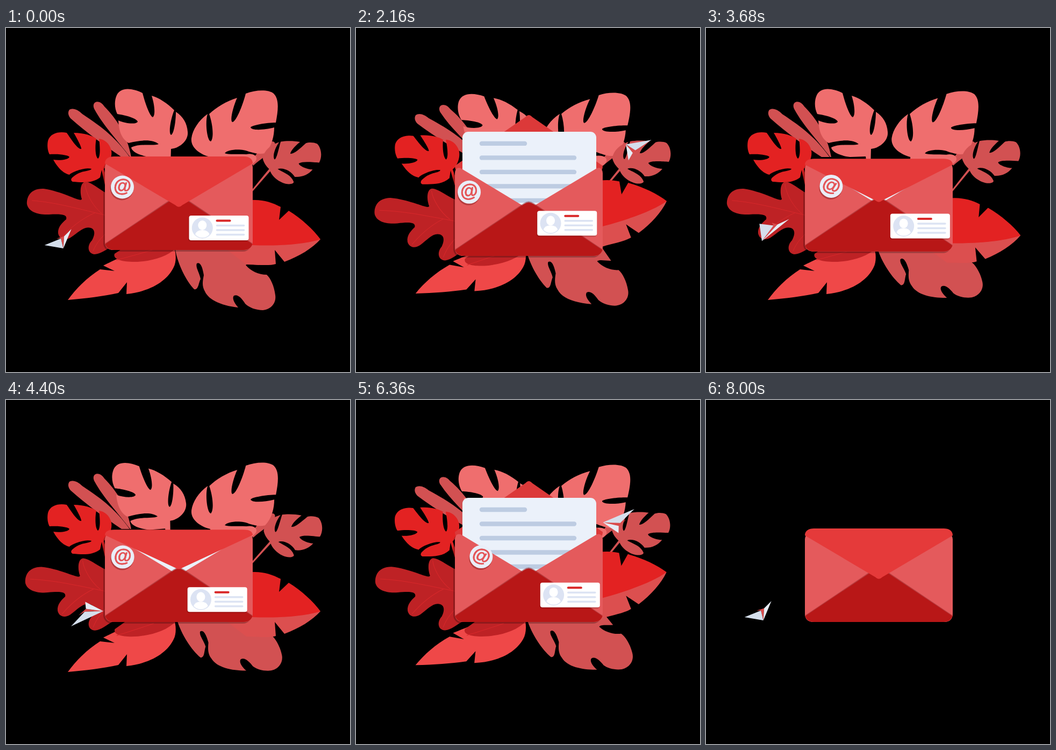
Animation of 640x640 px, one loop 8040 ms. Source, as an HTML page:

```html
<!DOCTYPE html>
<html lang="en">
<head>
<meta charset="utf-8">
<title>Open letter</title>
<style>
html, body { margin: 0; width: 100%; height: 100%; overflow: hidden; background: #000; }
svg { display: block; width: 100vw; height: 100vh; }
</style>
</head>
<body>
<svg viewBox="0 0 640 640">
  <g id="leaves">
    <g id="bars" fill="#d25152">
      <path d="M118 152C125 148 134 152 142 160C180 185 205 205 230 240L215 240C185 220 150 195 120 168C115 162 115 156 118 152Z"/>
      <path d="M165 139C170 135 178 138 183 146C205 168 226 200 233 240L231 240C208 210 180 180 165 152C162 147 162 142 165 139Z"/>
    </g>
    <path fill="#d25152" d="M455 250C468 230 485 212 496 211C502 212 502 218 497 224C485 238 472 245 460 256Z"/>
    <path id="topLeft" fill="#ef6e6e" d="M254 121C235 112 214 109 206 125C201 136 202 150 207 160C222 162 243 168 245 174C243 180 222 178 209 172C210 190 214 205 228 214C255 207 275 208 284 216C275 220 250 214 233 222C233 230 250 238 268 240L297 239L300 262L306 262L307 225C322 224 340 210 338 193C337 178 330 165 316 156C316 175 312 198 307 199C302 196 306 170 313 153C300 140 285 130 271 126C277 145 278 163 273 166C267 163 259 140 254 121Z"/>
    <path id="topRight" fill="#ef6e6e" d="M446 122C465 115 488 114 498 122C508 132 507 150 502 176C485 176 456 181 455 185C457 191 480 190 499 185C499 200 495 220 482 233C470 236 460 232 452 230C440 224 412 225 407 233C415 236 430 234 447 235C462 232 470 240 464 248L450 262L380 262L380 240C360 235 343 222 345 205C347 190 358 172 375 160C370 175 374 210 381 211C387 205 385 180 378 160C392 147 410 136 430 130C423 145 416 172 421 175C428 175 440 145 446 122Z"/>
    <path id="left" fill="#e32222" d="M113 195C100 192 82 195 78 210C76 220 78 230 81 235C95 234 116 236 118 240C116 245 100 247 88 245C95 258 105 270 118 273C125 266 150 259 159 262C158 267 140 264 126 276C120 280 120 284 124 286C140 287 160 290 175 278L178 264L184 292L190 290L182 262C192 255 198 240 196 228C193 215 183 207 173 206C175 220 176 240 171 243C165 238 166 215 168 206C160 200 145 195 126 195C133 207 141 222 140 225C133 226 120 205 113 195Z"/>
    <path id="right" fill="#d25152" d="M507 212C490 217 478 230 477 243C480 253 485 258 489 262L456 303L458 305L491 266C495 275 505 285 520 289C530 291 536 288 535 285C530 272 515 268 505 262C515 258 530 265 537 276C550 277 562 272 570 262C560 262 545 256 544 251C552 246 572 249 582 249C588 238 586 222 578 214C572 211 562 211 557 213C545 224 535 234 528 233C530 225 540 216 546 211C535 209 520 209 510 211C506 225 503 243 499 244C495 240 498 225 507 212Z"/>
    <path id="bottomRight" fill="#d25152" d="M315 413C320 440 335 470 350 486C358 488 358 475 362 467C360 455 352 445 355 438C362 434 366 447 368 460C366 470 364 480 370 490C378 508 405 517 432 520C425 512 420 503 424 498C432 494 440 505 445 513C452 520 465 525 478 525C495 523 503 510 501 497C499 480 492 465 485 459C470 459 455 452 446 441C450 437 462 441 472 441L440 390L320 390Z"/>
    <g id="spear">
      <path fill="#dc4f4f" d="M585 393C570 410 545 425 518 435L500 413L502 439C490 443 465 440 447 440L400 404L459 402Z"/>
      <path fill="#e32222" d="M400 320L459 320C478 319 497 325 511 333L508 357L526 340C550 355 572 375 585 393C560 402 510 406 459 404L400 404Z"/>
    </g>
    <path id="bottomLeft" fill="#ef4848" d="M115 506C130 485 150 465 175 449L202 452L181 442C200 432 240 415 260 405L312 405C317 420 317 435 312 445C300 470 270 490 224 495L225 473L209 493C180 499 150 503 115 506Z"/>
    <g id="oak" fill="#be2225">
      <path d="M148 286C138 287 137 305 141 318C140 326 110 305 70 299C45 298 38 315 39 328C42 342 60 348 80 347C100 346 115 346 112 356C105 362 96 370 97 382C99 393 110 396 120 390C135 380 145 368 158 372C168 376 164 388 160 395C150 405 152 420 165 421C178 420 185 412 200 405L230 320C190 320 165 287 148 286Z"/>
      <path d="M202 420C198 430 215 436 245 435C275 433 300 425 316 410L240 395Z"/>
      <path fill="none" stroke="#d8282b" d="M48 321C90 324 130 335 200 352M147 290C148 305 160 330 178 345M105 388C120 372 140 355 165 344M162 415C168 400 180 385 200 370M205 432C230 425 250 420 275 412"/>
    </g>
  </g>
  <g id="plane">
    <polygon fill="#d94a4a"/><polygon fill="#e6ecf5"/><polygon fill="#d5dfec"/>
  </g>
  <g id="envelope">
    <rect id="shade" x="181" y="248" width="276" height="168" rx="16" opacity=".25"/>
    <rect x="184" y="248" width="275" height="165" rx="15" fill="#c63030"/>
    <g id="flapBack"></g>
    <g id="letter">
      <rect x="198" width="249" height="150" rx="11" fill="#ebf1fa"/>
      <g id="lines" stroke="#bdcce2" stroke-width="8.4" stroke-linecap="round"></g>
    </g>
    <path fill="#e45a5c" d="M184 259Q185 247 195 250L321 326L448 250Q458 247 459 259V397Q459 413 443 413H200Q184 413 184 397Z"/>
    <path fill="#8c1f22" opacity=".5" d="M184 401L312 315Q321 308 331 315L459 401Z"/>
    <path fill="#b81717" d="M184.500 402L312 317Q321 310 331 317L458.500 402Q455 413 442 413H201Q188 413 184.500 402Z"/>
    <g id="flapFront"></g>
  </g>
  <path id="flap" d="M184 252C184 243 191 239 201 239H442C452 239 459 243 459 252L328 329.500Q321.500 336 315 329.500Z"/>
  <g id="badge">
    <circle cx="-1" cy="3" r="21.500" fill="#701010" opacity=".4"/>
    <circle r="21.500" fill="#e9eef8"/>
    <text id="at" y="8.800" text-anchor="middle" fill="#e45355" stroke="#e45355" stroke-width=".6" font-family="'Liberation Sans', Arial, sans-serif" font-size="34" font-weight="bold">@</text>
  </g>
  <g id="card">
    <rect x="-1" y="2" width="111" height="46" rx="4" fill="#600c0c" opacity=".3"/>
    <rect width="111" height="46" rx="4" fill="#fff"/>
    <circle cx="24.800" cy="23" r="19.500" fill="#dce3f3"/>
    <ellipse cx="24.800" cy="18" rx="8" ry="9" fill="#fff"/>
    <path fill="#fff" d="M11.500 35Q14 27 24.800 27T38 35Q33 41 24.800 41T11.500 35Z"/>
    <g stroke="#dce3f3" stroke-width="3.600" stroke-linecap="round">
      <path stroke="#d92828" stroke-width="4" d="M52 9.500H76"/>
      <path d="M52 18.500H102M52 27H102M52 35.500H102"/>
    </g>
  </g>
</svg>
<script>
const { sin, cos, PI, min, max } = Math;
const $ = id => document.getElementById(id);
const move = (el, x, y, rest = '') => el.setAttribute('transform', `translate(${x} ${y}) ${rest}`);
const ramp = (t, a, b) => min(1, max(0, (t - a) / (b - a)));
const ease = (t, a, b) => { const u = ramp(t, a, b); return u * u * (3 - 2 * u); };

// Two swings out and back per loop: one from 0, one from `again`.
const swing = (size, time, again) => t =>
  size * (sin(PI * ramp(t, 0, time)) + sin(PI * ramp(t, again, min(8, again + time))));

// Base of each leaf and its angle in degrees.
const leaves = [
  ['topLeft', 300, 260, swing(-7.2, 3.4, 4)],
  ['topRight', 385, 250, swing(2.6, 4, 4.35)],
  ['left', 195, 295, swing(-4, 3.6, 4.75)],
  ['oak', 367, 411, swing(-3.9, 3.15, 3.8)],
  ['bars', 235, 240, swing(-5, 3.7, 5.05)],
  ['right', 460, 300, t => 3 * sin(PI * t / 2) + .7],
  ['spear', 338, 381, swing(-17, 3.8, 4.8)],
  ['bottomLeft', 315, 430, swing(3.6, 3.6, 4.5)],
  ['bottomRight', 295, 380, t => -8.2 * sin(3 * PI * t / 8) ** 2]
];

const strokes = [80, 172, 172, 172, 172].map(length => {
  const el = document.createElementNS('http://www.w3.org/2000/svg', 'path');
  return { length, el: $('lines').appendChild(el) };
});

// The plane circles the envelope on a tilted ring, turning as it goes.
function drawPlane(t) {
  const a = PI * t / 2, s = sin(a), c = cos(a);
  const x = 315 - 215 * c + 15 * s, y = 312 + 84 * c + 28 * s;
  const nose = [66 * s + 10 * c, 21 * c - 38 * s];
  const wing = [25 * c - 12 * s, -15 * c - 18 * s];
  const at = (back, side) => {
    const k = 2 / 3 - back;
    return `${x + k * nose[0] + side * wing[0]},${y + k * nose[1] + side * wing[1]}`;
  };
  const tip = at(0, 0), foldA = at(.8, .38), foldB = at(.78, .13), keel = at(.95, -.12);
  const parts = [[tip, foldA, keel, foldB], [tip, at(1, 1), foldA], [tip, at(1, -1), foldB]];
  [...$('plane').children].forEach((el, i) => el.setAttribute('points', parts[i].join(' ')));
  const svg = $('plane').parentNode;
  if (t % 4 < 2) svg.append($('plane'));
  else svg.insertBefore($('plane'), $('envelope'));
}

function drawEnvelope(t, bob) {
  const c = t < 4 ? t : t - 4.08;
  const open = ease(c, .24, .65) * (1 - ease(c, 3.3, 3.75));
  const rise = ease(c, .5, .85) * (1 - ease(c, 2.8, 3.3));
  const tilt = 1 - 2.17 * open;
  move($('envelope'), 0, bob);
  const side = tilt > 0 ? $('flapFront') : $('flapBack');
  if ($('flap').parentNode !== side) side.append($('flap'));
  $('flap').setAttribute('fill', tilt > 0 ? '#e53a3a' : '#dc3939');
  move($('flap'), 0, 249, `scale(1 ${tilt}) translate(0 -249)`);
  move($('letter'), 0, 250 - 68 * rise);
  strokes.forEach(({ length, el }, i) => {
    const start = .61 + .2 * i, u = ramp(c, start, start + .17);
    el.setAttribute('d', u ? `M234 ${22 + 26.5 * i}h${length * u}` : '');
  });
}

function draw() {
  const now = Math.floor(performance.now() % 8040 / 40) * .04;
  const t = min(now, 8);
  const shown = now < 7.99 ? 'visible' : 'hidden';
  for (const id of ['leaves', 'shade', 'badge', 'card']) $(id).style.visibility = shown;
  for (const [id, x, y, angle] of leaves) $(id).setAttribute('transform', `rotate(${angle(t)} ${x} ${y})`);

  const bob = t < 4 ? 11 * sin(PI * t / 4) : 0;
  drawEnvelope(t, bob);
  const turn = 3 * PI * t / 4, roll = sin(turn - .5);
  move($('badge'), 222 + 11.5 * roll, 293.5 + 2.5 * cos(turn) + bob);
  $('at').setAttribute('transform', `rotate(${8 + 13 * roll})`);
  const p = t % 4;
  move($('card'), 340.5 + 3.5 * sin(turn), 349 - 8 * sin(PI * p / 4) + 3 * sin(PI * p / 2));
  drawPlane(t);
  requestAnimationFrame(draw);
}
draw();
</script>
</body>
</html>
```
